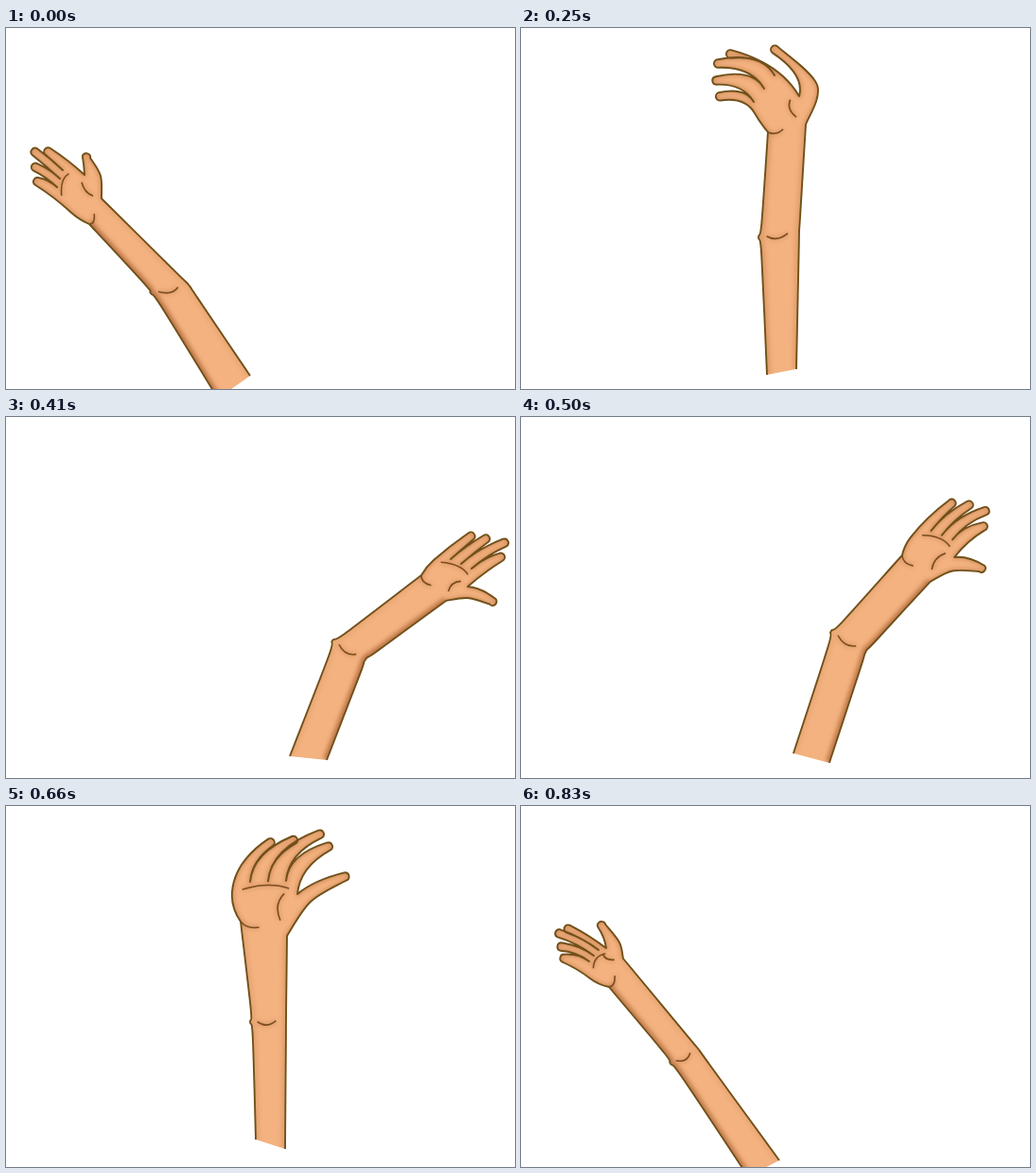
Animation of 538 by 381 pixels, one loop 0.91 s. Source, as an HTML page:

```html
<!DOCTYPE html>
<html lang="en">
<head>
<meta charset="utf-8">
<title>Waving arm</title>
<style>
html, body { margin: 0; width: 100%; height: 100%; overflow: hidden; background: #fff; }
svg { display: block; width: 100vw; height: 100vh; }
path { fill: none; stroke-linejoin: round; }
#skin { fill: #f3b27f; }
.ink { stroke: #70501a; stroke-width: 1.9; }
.crease { stroke: #7a4d20; stroke-width: 1.6; }
.shade { stroke: #a0562a; stroke-width: 8; filter: url(#soft); }
#digits { stroke-width: 4; opacity: .4; }
#folds { stroke-width: 4; opacity: .25; }
</style>
</head>
<body>
<svg viewBox="0 0 538 381" preserveAspectRatio="none">
  <defs>
    <filter id="soft" filterUnits="userSpaceOnUse" x="-20" y="-20" width="580" height="430">
      <feGaussianBlur stdDeviation="2"/>
    </filter>
    <clipPath id="inside"><path id="mask"/></clipPath>
  </defs>
  <path id="skin"/>
  <g clip-path="url(#inside)">
    <path id="left" class="shade"/>
    <path id="right" class="shade"/>
    <path id="digits" class="shade"/>
    <path id="folds" class="shade"/>
  </g>
  <path id="creases" class="crease"/>
  <path id="outline" class="ink"/>
</svg>
<script>
const LOOP = 910;

const lerp = (a, b, k) => a + (b - a) * k;
const mix = (p, q, k) => [lerp(p[0], q[0], k), lerp(p[1], q[1], k)];
const sub = (p, q) => [p[0] - q[0], p[1] - q[1]];
const along = (p, d, k) => [p[0] + d[0] * k, p[1] + d[1] * k];
const dist = (p, q) => Math.hypot(...sub(p, q));
const unit = v => along([0, 0], v, 1 / Math.hypot(...v));
const spin = ([x, y], a) => [x * Math.cos(a) - y * Math.sin(a), x * Math.sin(a) + y * Math.cos(a)];

// Joints: arm (left and right side of shoulder, elbow, wrist),
// hand (heel, lowest and highest finger gap, thumb web, thumb knuckle), five tips.
function pose(arm, hand, tips, left, right, palm = 1) {
  const joints = [arm, hand, tips].join(' ').split(' ').map(p => p.split(',').map(Number));
  return { joints, hub: mix(joints[0], joints[1], .5), left, right, palm };
}

const farLeft = pose('224,391 258,367 153,280 193,271 88,207 101,180',
  '68,194 54,168 60,150 83,155 100,156', '29,160 27,145 27,128 41,128 86,132', .65, .1);
const risingLeft = pose('248,376 279,361 188,242 231,241 135,150 167,120',
  '120,137 109,120 109,100 137,101 153,100', '74,111 67,97 64,81 81,72 130,65', .45, .15);
const upGoing = pose('260,366 291,360 251,221 294,215 261,110 301,102',
  '247,90 246,78 268,50 294,72 313,60', '206,73 202,56 204,38 217,27 265,20', .25, .2, 0);
const farRight = pose('300,358 339,362 345,236 380,256 439,167 465,194',
  '452,151 470,150 492,160 488,179 488,191', '495,123 511,126 531,131 527,146 517,198', .1, .65);
const risingRight = pose('272,351 307,369 302,213 342,236 347,122 383,150',
  '349,101 374,84 398,92 408,108 404,127', '399,44 421,45 437,56 438,73 443,116', .1, .6);
const upBack = pose('264,352 295,362 258,228 296,226 248,122 297,137',
  '239,90 258,80 296,79 308,93 322,101', '283,36 308,34 336,28 345,41 363,74', .15, .2);
const nearLeft = pose('240,391 273,374 158,272 187,256 93,191 108,161',
  '73,182 72,164 82,152 90,150 104,144', '41,160 38,148 36,133 46,128 84,122', .6, .1);

// Swings around the shoulder so the arm keeps its length.
function swing(a, b, k, turn = 0) {
  const hub = mix(a.hub, b.hub, k);
  const joints = a.joints.map((p, i) => {
    const u = sub(p, a.hub), v = sub(b.joints[i], b.hub);
    const gap = Math.atan2(u[0] * v[1] - u[1] * v[0], u[0] * v[0] + u[1] * v[1]);
    const reach = lerp(Math.hypot(...u), Math.hypot(...v), k);
    return along(hub, spin(unit(u), gap * k + turn), reach);
  });
  const blend = key => lerp(a[key], b[key], k);
  return { joints, hub, left: blend('left'), right: blend('right'), palm: blend('palm') };
}

const cycle = [
  [0, farLeft],
  [80, swing(farLeft, farLeft, 0, -.056)],
  [160, risingLeft],
  [250, upGoing],
  [330, swing(upGoing, farRight, .5)],
  [410, farRight],
  [500, swing(farRight, risingRight, .42)],
  [580, risingRight],
  [660, upBack],
  [750, swing(upBack, nearLeft, .5)],
  [830, nearLeft]
];

const fmt = p => p.map(v => v.toFixed(1)).join(' ');
const move = p => 'M' + fmt(p);
const quad = (c, p) => `Q${fmt(c)} ${fmt(p)}`;

// Smooth curve that continues from the first point.
function curve(pts) {
  let d = '';
  for (let i = 0; i < pts.length - 1; i++) {
    const p = pts[i], q = pts[i + 1], o = pts[i - 1] || p, r = pts[i + 2] || q;
    d += `C${fmt(along(p, sub(q, o), 1 / 6))} ${fmt(along(q, sub(r, p), -1 / 6))} ${fmt(q)}`;
  }
  return d;
}

// Rounded end of a finger that arrives from a bend point.
function fingertip(tip, bend, w) {
  const d = unit(sub(tip, bend)), mid = along(tip, d, -w), n = [d[1], -d[0]];
  const a = along(mid, n, w), b = along(mid, n, -w);
  return { a, b, cap: `A${w} ${w} 0 0 1 ${fmt(b)}` };
}

// Fingers leave the palm along its axis and bend towards their tips.
function finger(from, to, tip, axis) {
  const bend = p => along(p, axis, dist(p, tip) * .45);
  const end = fingertip(tip, bend(mix(from, to, .5)), 4.3);
  return quad(bend(from), end.a) + end.cap + quad(bend(to), to);
}

function shape(joints) {
  const [sl, sr, el, er, wl, wr, heel, low, high, web, knuckle, ...tips] = joints;
  const thumb = tips.pop();
  const axis = unit(sub(mix(low, high, .5), mix(wl, wr, .5)));

  const bump = p => along(mix(el, p, .13), unit(sub(er, el)), 2);
  const leftArm = [sl, bump(sl), el, bump(wl), wl];
  const rightArm = [wr, mix(er, wr, .15), er, mix(er, sr, .15), sr];

  const gaps = [heel, low, mix(low, high, .5), high, web];
  const fingers = tips.map((tip, i) => finger(gaps[i], gaps[i + 1], tip, axis)).join('');

  const bend = along(web, spin(axis, Math.PI / 4), dist(web, thumb) * .4);
  const end = fingertip(thumb, bend, 4.3);
  const hand = quad(along(heel, axis, -dist(wl, heel) / 2), heel) + fingers
    + quad(bend, end.a) + end.cap + curve([end.b, knuckle, wr]);

  const arc = (a, c, b) => move(a) + quad(c, b);
  const back = p => along(p, axis, -8);
  const down = unit(sub(mix(sl, sr, .5), mix(el, er, .5)));
  const web2 = mix(web, heel, .2), ball = mix(mix(wr, heel, .2), web, .2);
  return {
    leftArm: move(sl) + curve(leftArm),
    hand,
    rightArm: curve(rightArm),
    rightStart: move(wr),
    wristStart: move(wl),
    palm: arc(back(mix(low, high, -.2)), mix(low, high, .5), back(mix(low, high, 1.1))),
    lines: arc(mix(el, er, .2), along(mix(el, er, .45), down, 8), mix(el, er, .72))
      + arc(web2, mix(mix(web2, ball, .5), heel, .18), ball)
      + arc(wl, along(mix(wl, wr, .15), axis, -6), mix(wl, wr, .4))
  };
}

const els = {};
document.querySelectorAll('path').forEach(p => els[p.id] = p);
const set = (id, d) => els[id].setAttribute('d', d);

let shown = null;
function draw(time) {
  const t = time % LOOP;
  const now = cycle.findLast(step => step[0] <= t)[1];
  if (now === shown) return;
  shown = now;
  const s = shape(now.joints);
  const edge = s.leftArm + s.hand + s.rightArm;
  const creases = s.lines + (now.palm ? s.palm : '');
  set('skin', edge + 'Z');
  set('mask', edge + 'Z');
  set('outline', edge);
  set('left', s.leftArm);
  set('right', s.rightStart + s.rightArm);
  set('digits', s.wristStart + s.hand);
  set('creases', creases);
  set('folds', creases);
  els.left.style.opacity = now.left;
  els.right.style.opacity = now.right;
}

function tick(time) {
  draw(time);
  requestAnimationFrame(tick);
}
draw(0);
requestAnimationFrame(tick);
</script>
</body>
</html>
```
